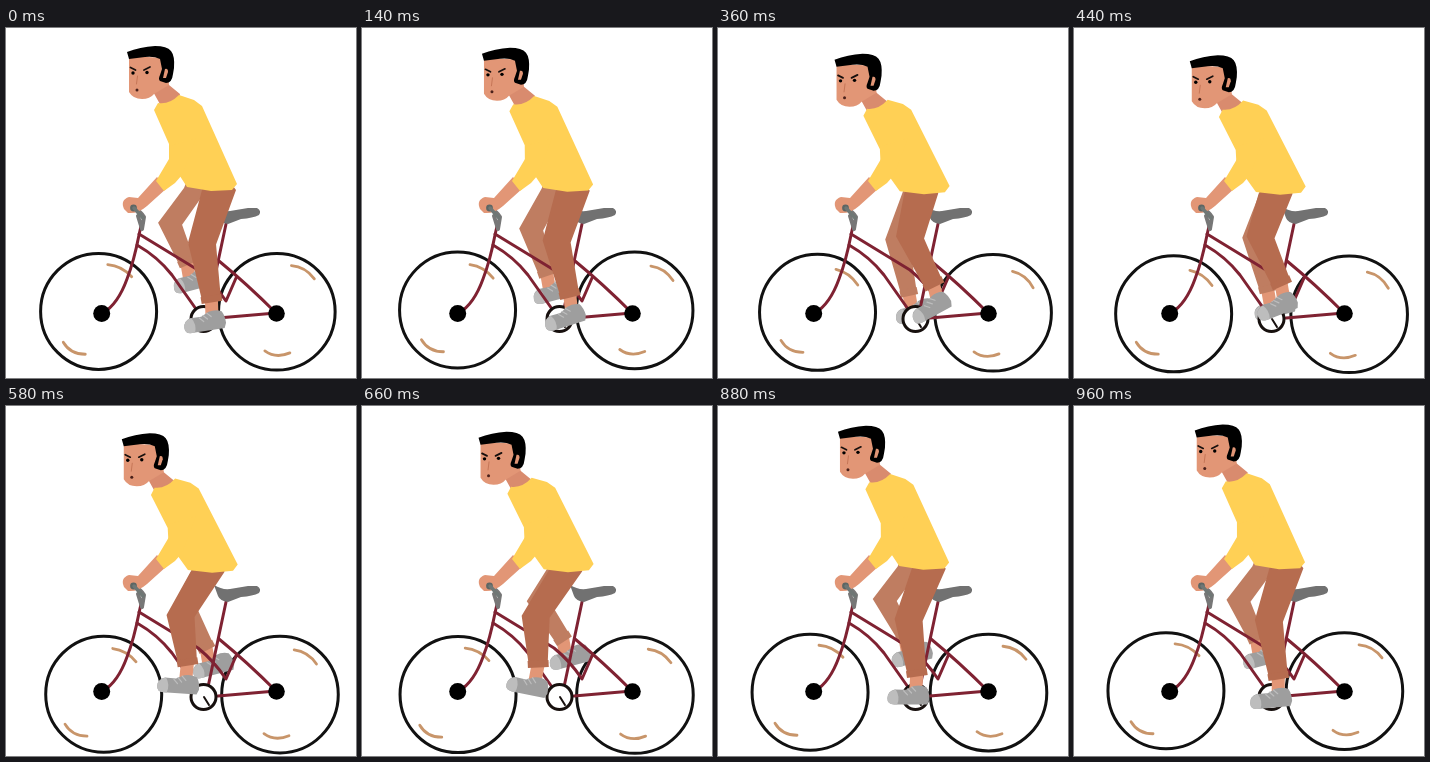
An HTML page for the animation above (1040 ms loop, 350 by 350 pixels).

```html
<!DOCTYPE html>
<html lang="en">
<head>
<meta charset="utf-8">
<title>Cyclist</title>
<style>
  html, body { margin: 0; width: 100%; height: 100%; overflow: hidden; background: #fff; }
  svg { display: block; width: 100vw; height: 100vh; }
  .line { fill: none; stroke-linecap: round; stroke-linejoin: round; }
  .tyre { stroke: #111; stroke-width: 3; }
  .mark { stroke: #c8956a; stroke-width: 2.8; }
  .tube { stroke: #7f2232; stroke-width: 3; }
  .near { fill: #b66c4f; stroke: #b66c4f; }
  .far { fill: #bf7d61; stroke: #bf7d61; }
  .pants { stroke: none; }
  .cuff { stroke-width: 7; }
  .ankle { stroke: #e29676; stroke-width: 13; }
  .skin { fill: #e29676; }
  .neck { fill: #d98b6e; }
  .shirt { fill: #ffd055; }
  .ink { stroke: #17100e; }
</style>
</head>
<body>
<svg viewBox="0 0 350 350">
  <defs>
    <g id="shoe">
      <path fill="#9e9e9e" d="M-21 3Q-21-4-14-6L-3-6 5-10Q12-12 18-9 21-4 21 3L19 8-14 9Q-21 9-21 3Z"/>
      <path fill="#bdbdbd" d="M-21 3Q-21-4-13-6Q-8 1-11 9L-14 9Q-21 9-21 3Z"/>
      <path class="line" stroke="#bdbdbd" stroke-width="1.2" d="M-5-5L-1-1M-1-7L3-3M3-9L7-5"/>
    </g>
  </defs>

  <circle class="line tyre" id="wheelL" r="58"/>
  <circle class="line tyre" id="wheelR" r="58.3"/>
  <path class="line mark" id="topL" d="M0 0q14 1 24 12"/>
  <path class="line mark" id="lowL" d="M0 0q7 12 22 12"/>
  <path class="line mark" id="topR" d="M0 0q14 1 23 13"/>
  <path class="line mark" id="lowR" d="M0 0q11 8 25 2"/>

  <g id="farLeg">
    <path class="line ankle"/><path class="far pants"/><path class="far cuff"/><use href="#shoe"/>
  </g>

  <g class="line tube">
    <path d="M135 198L133 207Q128 233 121 251Q112 276 97 285"/>
    <path d="M133 206L192 242Q208 255 220 273L230 250"/>
    <path d="M131 217Q152 229 166 247L190 281"/>
    <path d="M220 196L202 281M213 233Q241 256 270 285L212 290"/>
  </g>
  <circle cx="95.7" cy="285.5" r="8.5"/>
  <circle cx="270.5" cy="285.5" r="8.3"/>
  <path fill="#717171" d="M208 179Q216 184 224 183L242 180 251 180Q256 183 253 187Q247 190 235 191L222 196Q214 195 212 190Z"/>
  <path class="line" stroke="#777" stroke-width="4" d="M128 180Q135 184 138 189L136 201M132 188L136 201"/>
  <circle class="ink" cx="197.5" cy="291" r="12.5" fill="#fff" stroke-width="3"/>
  <path class="line ink" stroke-width="2" d="M198 291L203 299"/>

  <g id="nearLeg">
    <path class="line ankle"/><path class="near pants"/><path class="near cuff"/><use href="#shoe"/>
  </g>

  <path class="skin" d="M118 181Q114 172 123 169L132 170 151 149 161 160 141 178Q132 186 122 185Z"/>
  <circle cx="127.5" cy="180" r="3.4" fill="#5c6664"/>
  <path class="line" stroke="#6f7775" stroke-width="3.5" d="M128 180L137 190"/>

  <path class="neck" id="neck" d="M145 60L160 52 163 57 174 66 172 76 155 78Z"/>
  <path class="shirt" id="torso" d="M148 82L152 75Q163 77 173 67L188 72 196 78 231 156 226 162 205 163 181 159 163 131 163 116Z"/>
  <path class="shirt" d="M163 118L190 110 176 147 169 155 158 163 150 153 163 131Z"/>
  <g id="head">
    <path class="skin" d="M123 28L123 64Q127 71 136 71 144 71 148 66L163 57 160 30Z"/>
    <path d="M121 24Q134 19 149 18Q161 18 165 23Q169 28 168 40L167 46Q166 55 160 55L154 53Q152 51 154 47L156 41 154 31Q148 28 139 29L123 31Z"/>
    <path class="skin" d="M159 41Q162 40 162 44L160 50 157 50Z"/>
    <path class="line ink" stroke-width="1.7" d="M124.500 39.500L129.500 42M138 42L144 39"/>
    <circle cx="127" cy="45" r="1.7"/>
    <circle cx="141" cy="44.5" r="1.7"/>
    <path class="line" stroke="#c67657" stroke-width="1" d="M131.500 48L130.500 56"/>
    <circle cx="131" cy="62" r="1.5" fill="#4a201a"/>
  </g>
</svg>
<script>
const LOOP = 1040, POSES = 14, TICK = 220 / 3, RAD = Math.PI / 180;

const $ = id => document.getElementById(id);
const set = (el, name, value) => el.setAttribute(name, value);
const place = (el, x, y, turn = 0) => set(el, "transform", `translate(${x} ${y}) rotate(${turn})`);
const cos = deg => Math.cos(deg * RAD), sin = deg => Math.sin(deg * RAD);

// mean plus a swing once, and a smaller one twice, per turn of the pedals
const wave = (turn, mean, amp, lag, amp2, lag2) =>
  mean + amp * cos(turn - lag) + amp2 * cos(2 * turn - lag2);

// the knee bends forward from the middle of hip and ankle, more so when the leg is short
function drawLeg(group, hip, shoe, heel, kneeHalf, cuffHalf) {
  const [ankle, pants, cuff, foot] = group.children;
  const c = cos(shoe.tilt / 2), s = sin(shoe.tilt / 2);
  const ax = shoe.x + heel.x * c - heel.y * s, ay = shoe.y + heel.x * s + heel.y * c;
  const bend = 13 + .23 * (110 - Math.hypot(ax - hip.x, ay - hip.y));
  const kx = (hip.x + ax) / 2 - bend, ky = (hip.y + ay) / 2 - 2;
  const shin = Math.hypot(ax - kx, ay - ky);
  const px = (ay - ky) / shin * cuffHalf, py = (kx - ax) / shin * cuffHalf;
  const { x, y, half } = hip;

  set(ankle, "d", `M${ax} ${ay}L${shoe.x + heel.x * .9} ${shoe.y - 4}`);
  set(pants, "d", `M${x - 8} 150L${x - half} ${y}L${kx - kneeHalf} ${ky}L${ax - px} ${ay - py}
    L${ax + px} ${ay + py}L${kx + kneeHalf} ${ky + 2}L${x + half} ${y}L${x + 8} 150Z`);
  set(cuff, "d", `M${ax - px * 1.1} ${ay - py * 1.1}L${ax + px * 1.1} ${ay + py * 1.1}`);
  place(foot, shoe.x, shoe.y, shoe.tilt);
}

function draw(n) {
  const turn = 360 * n / POSES;
  const lean = (1 - cos(turn)) / 2;
  const sway = ((1 + cos(turn - 125)) / 2) ** 2;

  // tyres wobble around their hubs
  const wobble = turn - 145, y = 285.3 + 3.3 * sin(wobble);
  place($("wheelL"), 95.8 + 3.9 * cos(wobble), y);
  place($("wheelR"), 272.8 + 2.4 * cos(wobble), y + .4);
  place($("topL"), 101 + 17 * sway, y - 47 + 4 * sway, 9 * sway);
  place($("lowL"), 57 + 6 * sway, y + 31 - 3 * sway);
  place($("topR"), 285 + 9.5 * sway, y - 46 + 5 * sway, 9 * sway);
  place($("lowR"), 259 - 3 * sway, y + 39.5);

  drawLeg($("farLeg"), { x: 190 + 9 * lean, y: 160 + 3 * lean, half: 12 }, {
    x: wave(turn, 197.5, 9, 205, 2.5, 127),
    y: wave(turn, 262, 17.5, 121, 4.4, -90),
    tilt: -13
  }, { x: -5, y: -20 }, 12, 8);
  drawLeg($("nearLeg"), { x: 213 - 12 * lean, y: 162 + 4 * lean, half: 17 }, {
    x: wave(turn, 193, 20, 73, 9, -90),
    y: wave(turn, 285.2, 8, 0, 1.2, 0),
    tilt: wave(turn, -7, 18.5, -90, 5.8, 90)
  }, { x: 8, y: -23 }, 14, 9.5);

  set($("torso"), "transform", `translate(${lean} ${4 * lean}) rotate(${-3.15 * lean} 205 160)`);
  for (const id of ["neck", "head"]) place($(id), -5.5 * lean, 9.7 * lean);
}

// pose changes land on a 20 ms grid
const starts = Array.from({ length: POSES }, (_, i) => Math.round(i * TICK / 20) * 20);
let shown = -1;
function tick() {
  const t = performance.now() % LOOP;
  const n = starts.filter(s => s <= t).length - 1;
  if (n !== shown) draw(shown = n);
  requestAnimationFrame(tick);
}
tick();
</script>
</body>
</html>
```
